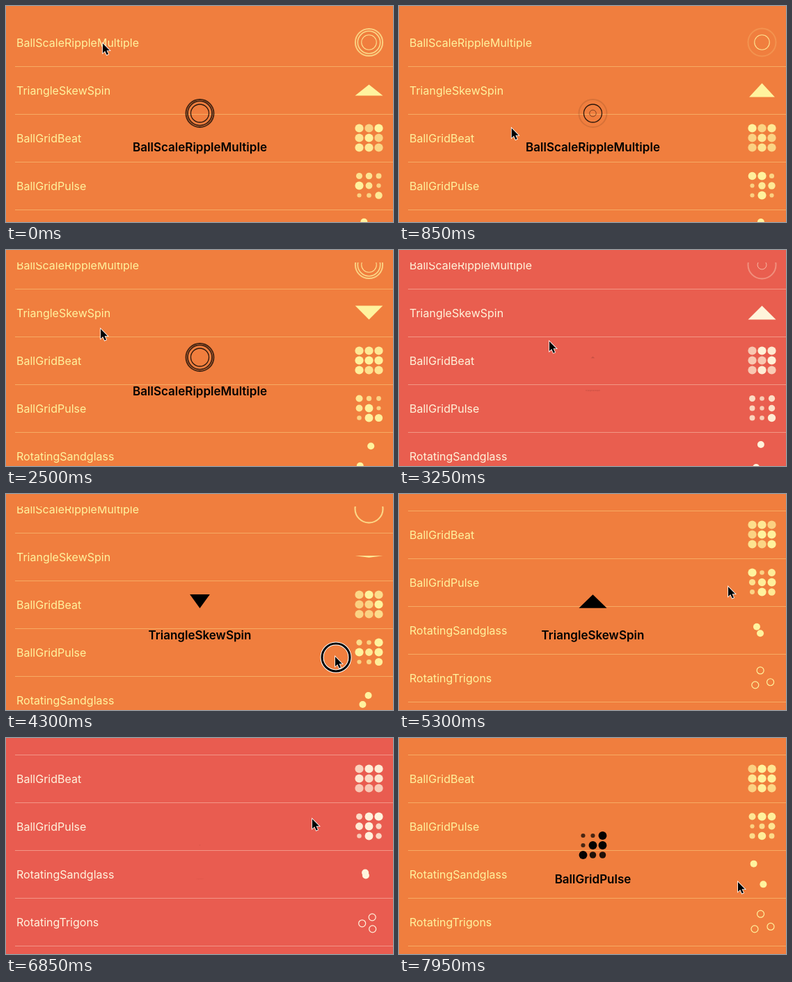
An HTML page with a canvas that plays this animation: 556x312 px, repeating every 8000 ms.

```html
<!DOCTYPE html>
<html lang="en">
<head>
<meta charset="utf-8">
<title>Loading indicators</title>
<style>
html, body { margin: 0; width: 100%; height: 100%; overflow: hidden; background: #f07e3e; }
canvas { display: block; }
</style>
</head>
<body>
<canvas id="stage" width="556" height="312"></canvas>
<script>
const ctx = document.getElementById('stage').getContext('2d');
const TAU = Math.PI * 2, LOOP = 8;
const clamp = (v, lo = 0, hi = 1) => Math.min(hi, Math.max(lo, v));
const frac = v => v - Math.floor(v);
const smooth = v => v * v * (3 - 2 * v);

function bezier(x1, y1, x2, y2) {
  const at = (a, b, s) => 3 * (1 - s) * (1 - s) * s * a + 3 * (1 - s) * s * s * b + s * s * s;
  return x => {
    let lo = 0, hi = 1;
    for (let i = 0; i < 20; i++) {
      const mid = (lo + hi) / 2;
      if (at(x1, x2, mid) < x) lo = mid; else hi = mid;
    }
    return at(y1, y2, lo);
  };
}
const ease = bezier(.25, .1, .25, 1);
const easeInOut = bezier(.42, 0, .58, 1);
const easeSpin = bezier(.09, .57, .49, .9);
const easeRipple = bezier(.21, .53, .56, .8);

// Value of a keyed track [[time, ...values], ...] at time t
function track(keys, t) {
  const next = keys.findIndex(k => k[0] > t);
  if (next === 0) return keys[0].slice(1);
  if (next < 0) return keys[keys.length - 1].slice(1);
  const a = keys[next - 1], b = keys[next];
  const u = smooth((t - a[0]) / (b[0] - a[0]));
  return a.slice(1).map((v, i) => v + (b[i + 1] - v) * u);
}

function disc(x, y, r) {
  ctx.beginPath();
  ctx.arc(x, y, r, 0, TAU);
  ctx.fill();
}
function ring(x, y, r, width) {
  ctx.lineWidth = width;
  ctx.beginPath();
  ctx.arc(x, y, r, 0, TAU);
  ctx.stroke();
}
function withAlpha(alpha, draw) {
  const base = ctx.globalAlpha;
  ctx.globalAlpha = base * alpha;
  draw();
  ctx.globalAlpha = base;
}

// Indicators are drawn around the origin in a 40 px box
const ripple = lead => t => {
  for (let i = 0; i < 3; i++) {
    const local = frac((t + lead - .2 * i) / 1.25) * 1.25;
    const grow = easeRipple(clamp(local / .6));
    const fade = easeRipple(clamp((local - .7) / .55));
    const scale = .1 + .9 * grow;
    withAlpha((1 - .3 * grow) * (1 - fade), () => ring(0, 0, 20 * scale, 2 * scale));
  }
};

const skewSpin = start => t => {
  const p = frac((t - start) / 3) * 4, turn = easeSpin(frac(p)) * Math.PI;
  const angleX = [turn, Math.PI, Math.PI - turn, 0][Math.floor(p)];
  const angleY = [0, turn, Math.PI, Math.PI - turn][Math.floor(p)];
  const w = 20 * Math.cos(angleY), h = 10 * Math.cos(angleX);
  ctx.beginPath();
  ctx.moveTo(0, -h);
  ctx.lineTo(w, h);
  ctx.lineTo(-w, h);
  ctx.fill();
};

// Each ball dips to lowScale and 70 % opacity and back at its own pace
const ballGrid = (periods, phases, lowScale, start = 0) => t => {
  periods.forEach((period, i) => {
    const u = frac((t - start) / period + phases[i]) * 2;
    const dip = u < 1 ? ease(u) : 1 - ease(u - 1);
    withAlpha(1 - .3 * dip, () =>
      disc(i % 3 * 14 - 14, Math.floor(i / 3) * 14 - 14, 6.1 * (1 - (1 - lowScale) * dip)));
  });
};
const beatPeriods = [.96, .93, 1.19, 1.13, 1.34, .94, 1.2, .82, 1.19];
const pulsePeriods = [.72, 1.02, 1.28, 1.42, 1.45, 1.18, .87, 1.45, 1.06];

function sandglass(t) {
  const q = (t - .02) / .8;
  const dist = 17 * Math.abs(Math.cos(Math.PI * q));
  const angle = .56 * clamp(1.5 * Math.sin(TAU * q), -1, 1);
  const x = dist * Math.sin(angle), y = -dist * Math.cos(angle);
  disc(-5 + x, y, 5);
  disc(-5 - x, -y, 5);
}

function trigons(t) {
  const p = (t - 5.3) * 1.5 + .28, u = easeInOut(frac(p));
  const corner = k => [16.7 * Math.sin(k * TAU / 3), -16.7 * Math.cos(k * TAU / 3)];
  for (let k = 0; k < 3; k++) {
    const a = corner(k), b = corner(k - 1);
    ring(a[0] + (b[0] - a[0]) * u, 2 + a[1] + (b[1] - a[1]) * u, 5, 1.2);
  }
}

const rows = [
  ['BallScaleRippleMultiple', ripple(.57)],
  ['TriangleSkewSpin', skewSpin(1.135)],
  ['BallGridBeat', ballGrid(beatPeriods, [.1, .4, 0, .65, .05, .4, .72, .1, .57], 1)],
  ['BallGridPulse', ballGrid(pulsePeriods, [.64, .13, .6, .915, .12, .38, .47, .31, .71], .5)],
  ['RotatingSandglass', sandglass],
  ['RotatingTrigons', trigons]
];
const huds = [
  { name: rows[0][0], icon: ripple(.64), from: -1, to: 2.85 },
  { name: rows[1][0], icon: skewSpin(3.225), from: 3.22, to: 6.53 },
  { name: rows[3][0], from: 6.95, to: 99,
    icon: ballGrid(pulsePeriods, [.45, .42, .85, .45, .85, .85, .85, .13, .13], .5, 7.95) }
];

const cursorKeys = [
  [.15, 139, 54], [1.05, 165, 194], [1.15, 165, 194], [1.45, 165, 166], [1.65, 165, 162],
  [1.8, 165, 162], [2.5, 136, 114], [2.7, 136, 100], [2.95, 136, 100], [3.9, 473, 235],
  [4.3, 473, 235], [4.95, 473, 134], [5.4, 473, 134], [6.3, 440, 117], [6.95, 440, 117],
  [7.8, 487, 208]
];
const scrollKeys = [[1.15, 0], [1.45, 27.5], [1.65, 31], [4.3, 31], [4.95, 132]];
const presses = [[1.05, 1.7], [2.72, 2.85], [4.2, 5], [6.4, 6.52]];

const mix = (a, b, u) => `rgb(${a.map((v, i) => Math.round(v + (b[i] - v) * u))})`;

function drawList(t, ink) {
  const [scroll] = track(scrollKeys, t);
  ctx.save();
  ctx.beginPath();
  ctx.rect(0, 18, 556, 294);
  ctx.clip();
  ctx.fillStyle = ctx.strokeStyle = ink;
  ctx.font = '400 16px Inter, sans-serif';
  ctx.textAlign = 'left';
  rows.forEach(([name, icon], i) => {
    const y = 69 * i - scroll;
    ctx.fillText(name, 15, y + 59);
    withAlpha(.38, () => ctx.fillRect(13, Math.round(y + 87), 543, 1));
    ctx.save();
    ctx.translate(521.5, y + 52.5);
    icon(t);
    ctx.restore();
  });
  ctx.restore();
}

function drawHud(hud, show, t) {
  const scaled = (y, draw) => {
    ctx.save();
    ctx.translate(278.5, y);
    ctx.scale(show, show);
    draw();
    ctx.restore();
  };
  ctx.fillStyle = ctx.strokeStyle = '#000';
  ctx.font = '600 17px Inter, sans-serif';
  ctx.textAlign = 'center';
  withAlpha(show, () => {
    scaled(155, () => hud.icon(t));
    scaled(203.5, () => ctx.fillText(hud.name, 0, 6.2));
  });
}

function drawCursor(t) {
  const [x, y] = track(cursorKeys, t);
  ctx.save();
  ctx.translate(x, y);
  if (presses.some(([down, up]) => t >= down && t < up)) {
    ctx.strokeStyle = '#fff';
    ring(1, 1, 20, 5);
    ctx.strokeStyle = '#000';
    ring(1, 1, 20, 3);
  }
  const arrow = new Path2D('M0 0V14L3.2 11L5.7 16.6L8 15.6L5.6 10.2H10Z');
  ctx.strokeStyle = '#fff';
  ctx.lineWidth = 1.6;
  ctx.stroke(arrow);
  ctx.fillStyle = '#000';
  ctx.fill(arrow);
  ctx.restore();
}

function draw(t) {
  const shows = huds.map(h => clamp((t - h.from) / .22) * (1 - clamp((t - h.to) / .345)));
  const warm = smooth(Math.max(...shows));
  ctx.fillStyle = mix([233, 92, 80], [240, 126, 62], warm);
  ctx.fillRect(0, 0, 556, 312);
  drawList(t, mix([255, 244, 223], [255, 243, 158], warm));
  huds.forEach((hud, i) => { if (shows[i] > 0) drawHud(hud, shows[i], t); });
  drawCursor(t);
}

const begin = performance.now();
function frame() {
  draw((performance.now() - begin) / 1000 % LOOP);
  requestAnimationFrame(frame);
}
frame();
</script>
</body>
</html>
```
